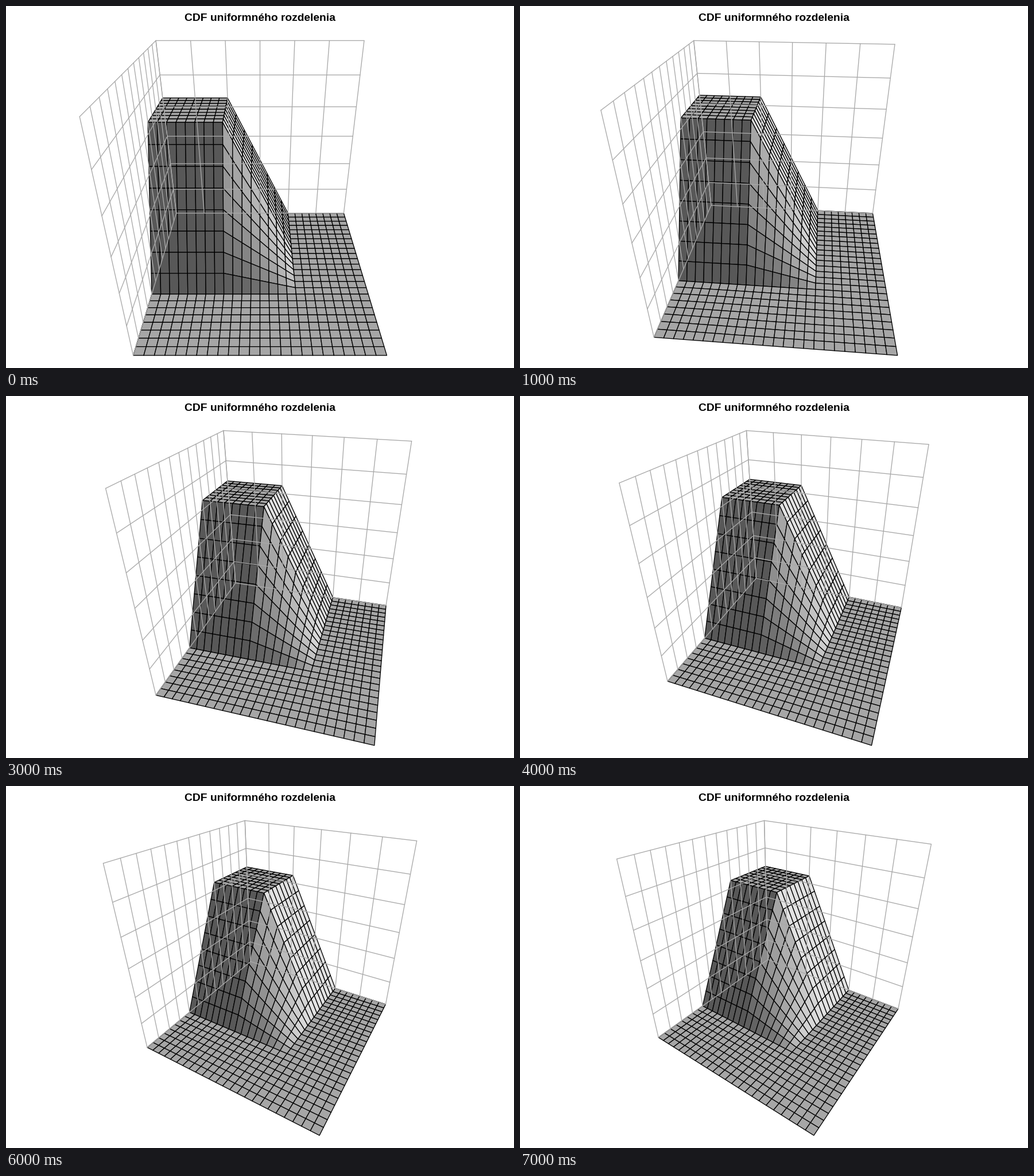
Write a matplotlib script that moves like this. It is 885x632 px and loops after 8000 ms.

```python
import numpy as np
import matplotlib.pyplot as plt
from matplotlib.animation import FuncAnimation
from matplotlib.collections import LineCollection, PolyCollection

W, H, DPI = 885, 632, 96
TOP, BOTTOM = 60.385, 610.015    # vertical extent of the projected cube
PHI = np.radians(30)
DIST = 2 + np.sqrt(3)            # eye distance
STEP = 5                         # degrees of turn per frame
FRAMES = 8
CELLS = 24
Z_MAX = 1.4
SHADE = 0.62
LIGHT = np.array([1, 1, 0]) / np.sqrt(2)
GRID = "#a9a9a9"


def rotate(p, theta):
    c, s = np.cos(theta), np.sin(theta)
    x, y, z = p[..., 0], p[..., 1], p[..., 2]
    return x * c + y * s, y * c - x * s, z


def project(p, theta):
    """Perspective view of points in the cube [-1, 1]^3."""
    x, y, z = rotate(p, theta)
    depth = DIST - z * np.sin(PHI) + y * np.cos(PHI)
    up = z * np.cos(PHI) + y * np.sin(PHI)
    return np.stack([x, -up], axis=-1) / depth[..., None]


CORNERS = np.array([(x, y, z) for x in (-1, 1) for y in (-1, 1) for z in (-1, 1)])


def to_screen(p, theta):
    """Project, then fit the whole cube into the plot region."""
    box = project(CORNERS, theta)
    low, high = box.min(axis=0), box.max(axis=0)
    scale = (BOTTOM - TOP) / (high[1] - low[1])
    centre = np.array([W / 2, (TOP + BOTTOM) / 2])
    return centre + scale * (project(p, theta) - (low + high) / 2)


def make_surface():
    t = np.linspace(-1, 1, CELLS + 1)
    x, y = np.meshgrid(t, t, indexing="ij")
    ramp = lambda v: np.clip(1.5 * v + 0.5, 0, 1)
    z = 2 * ramp(-x) * ramp(y) / Z_MAX - 1
    p = np.stack([x, y, z], axis=-1)
    a, b, c, d = p[:-1, :-1], p[1:, :-1], p[1:, 1:], p[:-1, 1:]
    normal = np.cross(b - d, c - a)
    normal /= np.linalg.norm(normal, axis=-1, keepdims=True)
    grey = ((1 + normal @ LIGHT) / 2) ** SHADE
    return np.stack([a, b, c, d], axis=2).reshape(-1, 4, 3), grey.ravel()


def make_walls():
    sixths, twelfths = np.linspace(-1, 1, 7), np.linspace(-1, 1, 13)
    lines = [[(x, 1, -1), (x, 1, 1)] for x in sixths]
    lines += [[(-1, y, -1), (-1, y, 1)] for y in twelfths]
    for z in sixths:
        lines += [[(-1, 1, z), (1, 1, z)], [(-1, -1, z), (-1, 1, z)]]
    return np.array(lines)


facets, greys = make_surface()
walls = make_walls()

fig = plt.figure(figsize=(W / DPI, H / DPI), dpi=DPI, facecolor="white")
ax = fig.add_axes([0, 0, 1, 1])
ax.set_xlim(0, W)
ax.set_ylim(H, 0)
ax.axis("off")

surface = PolyCollection([], edgecolors="black", linewidths=1,
                         joinstyle="round", snap=False)
grid = LineCollection([], colors=GRID, linewidths=1,
                      capstyle="round", snap=False, zorder=3)
ax.add_collection(surface, autolim=False)
ax.add_collection(grid, autolim=False)
ax.text(W / 2, 26, "CDF uniformného rozdelenia", ha="center", va="baseline",
        family="Liberation Sans", weight="bold", size=14.4, color="black")


def update(frame):
    theta = np.radians(STEP * frame)
    # Back to front, by distance along the ground.
    order = np.argsort(-rotate(facets.mean(axis=1), theta)[1], kind="stable")
    surface.set_verts(to_screen(facets[order], theta))
    surface.set_facecolor(np.repeat(greys[order, None], 3, axis=1))
    grid.set_segments(to_screen(walls, theta))
    return surface, grid


anim = FuncAnimation(fig, update, frames=FRAMES, interval=1000,
                     repeat=True, repeat_delay=0, blit=False)
plt.show()
```
